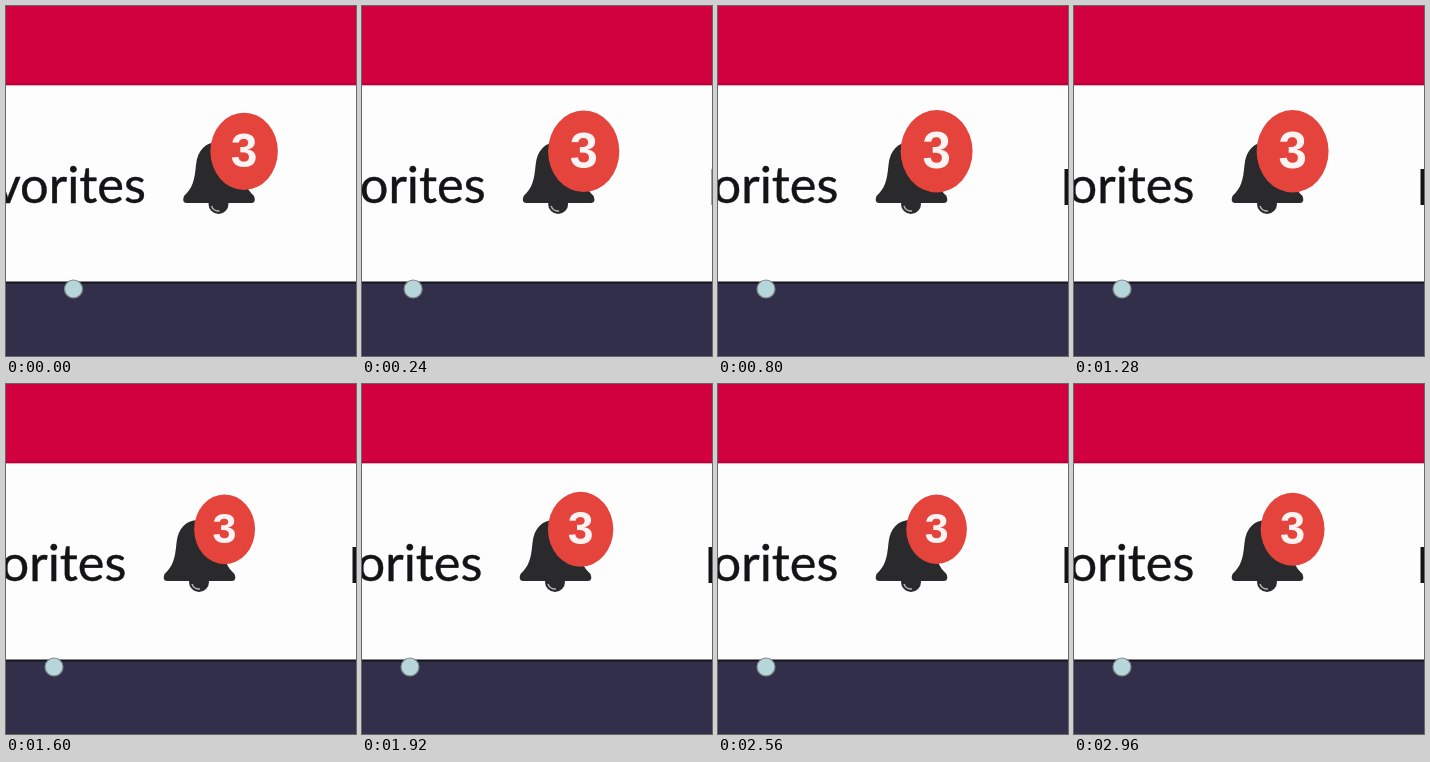
Recreate the animation shown at these times as an HTML page. Size 350 by 350 pixels, loop 3040 ms.

```html
<!DOCTYPE html>
<html lang="en">
<head>
<meta charset="utf-8">
<title>Notification bell</title>
<style>
  html, body { margin: 0; width: 100%; height: 100%; overflow: hidden; }
  svg { display: block; width: 100vw; height: 100vh; }
  .label { font: 50.6px Lato, sans-serif; fill: #141416; stroke: #141416; stroke-width: .4; text-anchor: end; }
  .count { font: bold 43px "Liberation Sans", Arial, sans-serif; fill: #fcf3f2; text-anchor: middle; }
</style>
</head>
<body>
<svg viewBox="0 0 350 350">
  <rect width="350" height="350" fill="#fdfdfd"/>
  <rect width="350" height="80" fill="#e9a9bd"/>
  <rect width="350" height="79" fill="#b00038"/>
  <rect width="350" height="77.500" fill="#d1003f"/>
  <rect y="276" width="350" height="74" fill="#322f4b"/>
  <rect y="275.500" width="350" height="2" fill="#15141b"/>
  <g id="page">
    <text class="label" x="120.500" y="197">Favorites</text>
    <rect x="346.500" y="163" width="5" height="36" fill="#141416"/>
    <circle cx="48" cy="283" r="9" fill="#b7d6d9" stroke="#7f868c" stroke-width="1.200"/>
    <circle cx="193" cy="198" r="10" fill="#2a2a2c"/>
    <path d="M186 200a7.500 7.500 0 0 0 8 5" fill="none" stroke="#b9b9bb" stroke-width="1.500"/>
    <path d="M193 136C180 136 172 144 170.500 159C169 175 167 182 158.500 190Q156 197 161 197H226Q231 197 228.500 190C220 182 218 175 216.500 159C214 144 206 136 193 136Z" fill="#2a2a2c"/>
    <g id="badge">
      <ellipse rx="30.300" ry="34.700" fill="#e5443d"/>
      <text class="count" y="14">3</text>
    </g>
  </g>
</svg>
<script>
  const LOOP = 3040, STEP = 80, BEAT = 510, PEAK = 275;
  const page = document.getElementById("page");
  const badge = document.getElementById("badge");

  // Narrow swell once per beat; the loop opens with a half-swollen badge.
  function swell(t) {
    const wave = 0.5 + 0.5 * Math.cos(2 * Math.PI * (t - PEAK) / BEAT);
    return Math.max(wave ** 1.6, 0.6 * (1 - t / 160));
  }

  function draw(now) {
    const t = Math.floor(now % LOOP / STEP) * STEP;
    const shift = 19.5 * Math.max(0, 1 - t / 400) ** 2;
    page.setAttribute("transform", `translate(${shift})`);
    badge.setAttribute("transform", `translate(218.600 145.300) scale(${1 + 0.19 * swell(t)})`);
  }

  const start = performance.now();
  function tick() {
    draw(performance.now() - start);
    requestAnimationFrame(tick);
  }
  tick();
</script>
</body>
</html>
```
